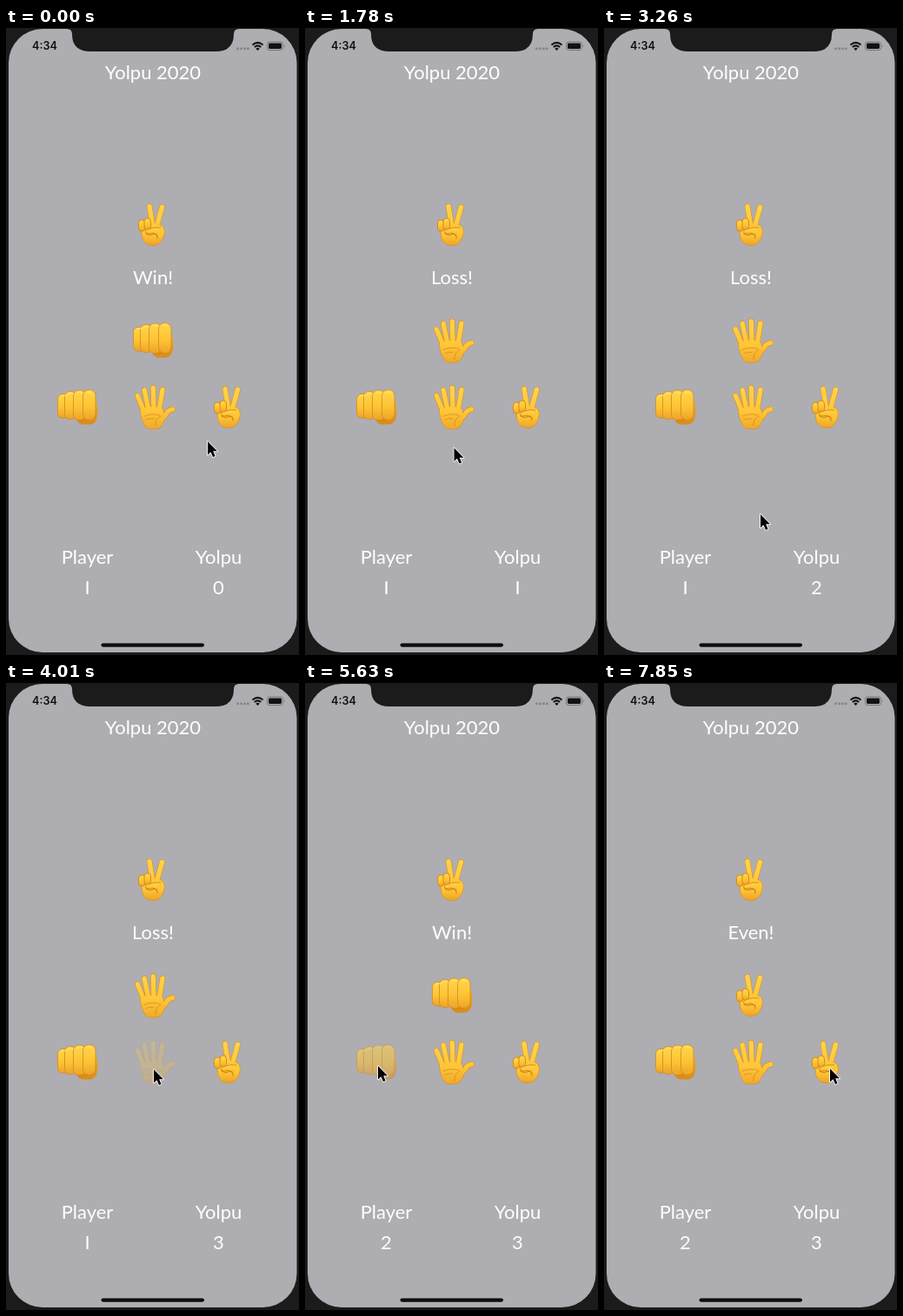
An HTML page for the animation above (8 s loop, 337 by 722 pixels).

```html
<!DOCTYPE html>
<html lang="en">
<head>
<meta charset="utf-8">
<title>Rock paper scissors</title>
<style>
  html, body { margin: 0; width: 100%; height: 100%; overflow: hidden; background: #1b1b1b; }
  svg { display: block; width: 100vw; height: 100vh; }
  .label { font: 22px Lato, "Open Sans", sans-serif; fill: #fff; text-anchor: middle; }
  .clock { font: 600 12.6px Inter, Roboto, sans-serif; fill: #111; }
  .edge { stroke: #dc921f; }
  .skin { stroke: url(#skinV); }
  .edge, .skin, .crease { fill: none; stroke-linecap: round; stroke-linejoin: round; }
  .crease { stroke: #c97a12; stroke-width: 1; }
</style>
</head>
<body>
<svg viewBox="0 0 337 722" xmlns="http://www.w3.org/2000/svg">
  <defs>
    <linearGradient id="skin" x1="0" y1="0" x2="0" y2="1">
      <stop offset="0" stop-color="#ffd64c"/>
      <stop offset=".55" stop-color="#fdc435"/>
      <stop offset="1" stop-color="#eda329"/>
    </linearGradient>
    <linearGradient id="skinV" gradientUnits="userSpaceOnUse" x1="0" y1="0" x2="0" y2="51">
      <stop offset="0" stop-color="#ffd44a"/>
      <stop offset=".6" stop-color="#fec638"/>
      <stop offset="1" stop-color="#efa82c"/>
    </linearGradient>
    <linearGradient id="shade" x1="0" y1="0" x2="0" y2="1">
      <stop offset="0" stop-color="#f4b233"/>
      <stop offset="1" stop-color="#d98b18"/>
    </linearGradient>

    <g id="rock">
      <path d="M22 28 L40 8 Q46 12 46.500 24 Q47 40 37 40.500 L28 40.500 Q21 39 22 28Z" fill="url(#shade)"/>
      <path d="M24 36 Q35 38 43 31" class="crease" opacity=".6"/>
      <g fill="url(#skin)" stroke="#d48a1c" stroke-width=".8">
        <rect x=".5" y="5.500" width="13" height="27.500" rx="5.500"/>
        <rect x="8.500" y="2.500" width="13" height="32" rx="5.800"/>
        <rect x="18.500" y="1" width="14" height="34.500" rx="6.300"/>
        <rect x="29.500" y=".5" width="14.500" height="35" rx="6.800"/>
      </g>
      <path d="M4 8 Q7 6 10 7 M12 6 Q15 4 18 5 M23 4 Q26 3 29 4 M34 4 Q37 3 40 4" fill="none" stroke="#ffe27a" stroke-width="1.500" stroke-linecap="round" opacity=".7"/>
    </g>

    <path id="fingers" d="M3.300 12.500 L11 31 M11.200 6 L16 29 M21.300 3.300 L22 29 M32 5.500 L28 30 M43.700 28 Q38 29 36 34 L29 42"/>
    <path id="palm" d="M9 30 Q20 25 30 29 L32 36 Q31 47 25 48 L17 48 Q12 47 9 30Z"/>
    <g id="paper">
      <use href="#fingers" class="edge" stroke-width="6.500"/>
      <use href="#palm" class="edge" stroke-width="6"/>
      <use href="#fingers" class="skin" stroke-width="5.200"/>
      <use href="#palm" class="skin" stroke-width="4.600" style="fill:url(#skinV)"/>
      <path d="M11 36 Q20 32 29 35 M30 36 Q23 39 24 47 M13 40 Q18 38 22 39" class="crease" opacity=".55"/>
    </g>

    <path id="vee" d="M13 3.500 L16.500 25 M27.500 4.300 L21.500 26"/>
    <g id="scissors">
      <path d="M5 25 Q17 17 29 27 Q32 32 29 39 Q26 48.500 17 48.500 Q8 48.500 5 40 Q3 32 5 25Z" fill="url(#skin)" stroke="#dc921f" stroke-width=".8"/>
      <use href="#vee" class="edge" stroke-width="6.500"/>
      <use href="#vee" class="skin" stroke-width="5.300"/>
      <path d="M9 27 Q17 20 27 26 L28 36 L12 37Z" fill="#fec63a"/>
      <g fill="url(#skin)" stroke="#d08518" stroke-width=".9">
        <rect x=".5" y="19" width="7.500" height="13" rx="3.700"/>
        <rect x="7" y="17" width="7.500" height="13.500" rx="3.700"/>
        <path d="M26 28 Q18 27 12 29.500 Q7 31 9 34 Q11 36 17 34 Q21 35 22 38"/>
      </g>
      <path d="M9 35 Q14 38 18 35 Q23 36 22 40" class="crease" stroke-width="1.500"/>
    </g>
  </defs>

  <rect width="337" height="722" fill="#1b1b1b"/>
  <rect x="3" y="1" width="331.500" height="718" rx="39" fill="#aeadb2"/>
  <path d="M70 0 V1 Q76 1 76 7 Q76 27 97 27 H241 Q262 27 262 7 Q262 1 268 1 V0Z" fill="#1b1b1b"/>
  <rect x="109.500" y="708.500" width="118.500" height="4.200" rx="2.100" fill="#0c0c0c"/>

  <text class="clock" x="30" y="25">4:34</text>
  <g fill="#85858a">
    <circle cx="266.500" cy="23.800" r="1.500"/><circle cx="270.500" cy="23.800" r="1.500"/>
    <circle cx="274.500" cy="23.800" r="1.500"/><circle cx="278.300" cy="23.800" r="1.500"/>
  </g>
  <g fill="none" stroke="#111" stroke-width="2">
    <path d="M283.500 19.500 Q289.500 14.300 295.500 19.500"/>
    <path d="M285.800 22 Q289.500 18.800 293.200 22"/>
  </g>
  <path d="M287.300 23.700 Q289.500 22 291.700 23.700 L289.500 26Z" fill="#111"/>
  <rect x="300.500" y="16" width="18" height="9.500" rx="2.600" fill="none" stroke="#77777b"/>
  <rect x="302" y="17.500" width="15" height="6.500" rx="1.400" fill="#111"/>
  <path d="M320 19 Q321.800 20.700 320 22.500Z" fill="#77777b"/>

  <g class="label">
    <text x="169" y="59">Yolpu 2020</text>
    <text id="result" x="169" y="295"></text>
    <text x="93.500" y="617">Player</text>
    <text x="244.500" y="617">Yolpu</text>
    <text id="mine" x="93.500" y="652"></text>
    <text id="theirs" x="244.500" y="652"></text>
  </g>

  <use href="#scissors" x="152" y="202"/>
  <use id="choice"/>
  <use id="btn-rock" href="#rock" x="59" y="416"/>
  <use id="btn-paper" href="#paper" x="148" y="411"/>
  <use id="btn-scissors" href="#scissors" x="239" y="412"/>

  <path id="cursor" d="M0 0 V15.500 L3.500 12.300 L6 18 L8.600 16.900 L6.200 11.300 H11Z" fill="#000" stroke="#fff" stroke-width="1.700" stroke-linejoin="round" paint-order="stroke"/>
</svg>

<script>
const LOOP = 8000, TICKS = 54;
const $ = id => document.getElementById(id);

// Where the chosen hand is shown
const SPOT = { rock: [146, 339], paper: [148, 334.5], scissors: [152, 335] };

// tick, hand, result, player score, opponent score
const ROUNDS = [
  [-9, 'rock', 'Win!', 1, 0],
  [2, 'paper', 'Loss!', 1, 1],
  [16, 'paper', 'Loss!', 1, 2],
  [27, 'paper', 'Loss!', 1, 3],
  [37, 'rock', 'Win!', 2, 3],
  [51, 'scissors', 'Even!', 2, 3]
];
const FADE = [0.25, 0.55];

// tick, x, y of the pointer tip
const PATH = [
  [0, 232, 476], [1, 195, 458], [2, 170, 446], [4, 172, 460], [5, 182, 504],
  [8, 202, 606], [9, 200, 598], [11, 180, 520], [13, 163, 447], [18, 163, 447],
  [20, 178, 500], [22, 180, 560], [23, 169, 533], [25, 170, 445], [30, 170, 445],
  [33, 150, 490], [35, 110, 475], [37, 84, 441], [38, 84, 441],
  [42, 175, 574], [44, 175, 574], [46, 142, 522], [47, 109, 484],
  [48, 118, 474], [49, 170, 466], [50, 225, 454], [51, 260, 444], [54, 260, 444]
];

function pointer(tick) {
  const i = PATH.findIndex(p => p[0] > tick);
  const [t0, x0, y0] = PATH[i - 1], [t1, x1, y1] = PATH[i];
  const k = (tick - t0) / (t1 - t0);
  return [x0 + (x1 - x0) * k, y0 + (y1 - y0) * k];
}

// This typeface style writes one as a plain bar
const digit = n => n === 1 ? 'I' : String(n);

function draw(tick) {
  const [start, hand, result, mine, theirs] = ROUNDS.filter(r => r[0] <= tick).pop();
  const [x, y] = SPOT[hand];
  $('choice').setAttribute('href', '#' + hand);
  $('choice').setAttribute('x', x);
  $('choice').setAttribute('y', y);
  $('result').textContent = result;
  $('mine').textContent = digit(mine);
  $('theirs').textContent = digit(theirs);
  for (const name in SPOT) {
    $('btn-' + name).setAttribute('opacity', name === hand ? FADE[tick - start] ?? 1 : 1);
  }
  $('cursor').setAttribute('transform', `translate(${pointer(tick)})`);
}

let last = -1;
function loop() {
  const tick = Math.floor(((performance.now() + 2) % LOOP) * TICKS / LOOP);
  if (tick !== last) draw(last = tick);
  requestAnimationFrame(loop);
}
draw(0);
loop();
</script>
</body>
</html>
```
